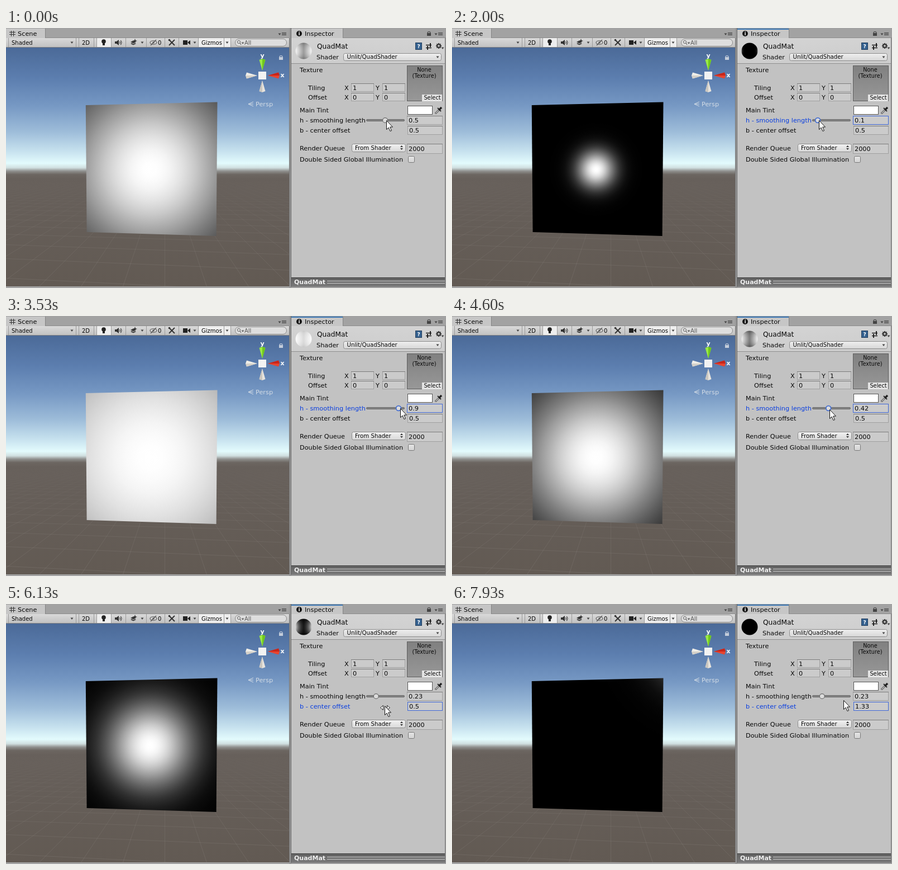
Write an HTML page with a canvas that moves like this. It is 788 by 465 pixels and loops after 8000 ms.

```html
<!DOCTYPE html>
<html lang="en">
<head>
<meta charset="utf-8">
<title>Shader inspector</title>
<style>
html, body { margin: 0; width: 788px; height: 465px; overflow: hidden; background: #a2a2a2; }
canvas { display: block; }
</style>
</head>
<body>
<canvas id="stage" width="788" height="465"></canvas>
<script>
const W = 788, H = 465, LOOP = 8000, FPS = 15;
const screen2d = document.getElementById('stage').getContext('2d');
const backdrop = document.createElement('canvas');
backdrop.width = W;
backdrop.height = H;
let g = backdrop.getContext('2d');

const BLUE = '#0a3fe0';
const QUAD = [[142.8, 138], [378.5, 132.6], [376.6, 372], [144.6, 365]];

// ---- drawing helpers
function rect(x, y, w, h, fill, stroke) {
  if (fill) { g.fillStyle = fill; g.fillRect(x, y, w, h); }
  if (stroke) { g.strokeStyle = stroke; g.lineWidth = 1; g.strokeRect(x + .5, y + .5, w - 1, h - 1); }
}
function rounded(x, y, w, h, r, fill, stroke) {
  g.beginPath();
  g.roundRect(x + .5, y + .5, w - 1, h - 1, r);
  if (fill) { g.fillStyle = fill; g.fill(); }
  if (stroke) { g.strokeStyle = stroke; g.lineWidth = 1; g.stroke(); }
}
function poly(points, fill, stroke, width = 1) {
  g.beginPath();
  points.forEach(([x, y]) => g.lineTo(x, y));
  g.closePath();
  if (fill) { g.fillStyle = fill; g.fill(); }
  if (stroke) { g.strokeStyle = stroke; g.lineWidth = width; g.stroke(); }
}
function line(x1, y1, x2, y2, color, width = 1) {
  g.beginPath();
  g.moveTo(x1, y1);
  g.lineTo(x2, y2);
  g.strokeStyle = color;
  g.lineWidth = width;
  g.stroke();
}
function disc(x, y, r, fill, stroke, width = 1) {
  g.beginPath();
  g.arc(x, y, r, 0, 7);
  if (fill) { g.fillStyle = fill; g.fill(); }
  if (stroke) { g.strokeStyle = stroke; g.lineWidth = width; g.stroke(); }
}
function text(s, x, y, size = 11.3, color = '#080808', weight = '', align = 'left') {
  g.font = `${weight} ${size}px "DejaVu Sans", sans-serif`;
  g.fillStyle = color;
  g.textAlign = align;
  g.fillText(s, x, y);
}
function vertical(y1, y2, ...stops) {
  const fill = g.createLinearGradient(0, y1, 0, y2);
  stops.forEach((c, i) => fill.addColorStop(i / (stops.length - 1), c));
  return fill;
}
const arrowDown = (x, y, c = '#444') => poly([[x - 2.5, y - 1.5], [x + 2.5, y - 1.5], [x, y + 2]], c);

function field(x, y, w, h, value, focused) {
  rect(x, y, w, h, '#cbcbcb', focused ? '#4169d8' : '#a0a0a0');
  if (!focused) rect(x, y, w, 1, '#7c7c7c');
  text(value, x + 3, y + h / 2 + 4);
}
function padlock(x, y, color) {
  rect(x - 3, y, 7, 5, color);
  g.beginPath();
  g.arc(x + .5, y, 2.5, Math.PI, 0);
  g.strokeStyle = color;
  g.lineWidth = 1.2;
  g.stroke();
}
function paneMenu(x) {
  arrowDown(x, 11);
  for (const y of [8, 10, 12]) rect(x + 4, y, 8, 1, '#444');
}

// ---- scene pane
function drawGround() {
  const horizon = 238, focal = 371, height = 3, yaw = 0.082;
  const cos = Math.cos(yaw), sin = Math.sin(yaw);
  const project = (a, b) => {
    const z = b * cos - a * sin, x = a * cos + b * sin;
    return [254 + focal * x / z, horizon + focal * height / z];
  };
  const fade = vertical(268, 462, 'rgba(165,160,155,0)', 'rgba(165,160,155,.12)', 'rgba(165,160,155,.18)');
  for (let n = -30; n <= 30; n++) line(...project(n, 3.8 + Math.max(0, n * .1)), ...project(n, 38), fade);
  for (let n = 4; n < 34; n++) line(...project(-n * .9, n), ...project(n * .9, n), fade);
}
function drawSky() {
  const stops = [[35, '#4b6a98'], [90, '#5c7eaf'], [140, '#7799c4'], [185, '#9dbcd9'], [220, '#c6e1ee'],
    [242, '#e3fbfd'], [250, '#d0dfe0'], [256, '#8f8f8d'], [262, '#6c6661'], [270, '#67605b'], [462, '#625a53']];
  const sky = g.createLinearGradient(0, 35, 0, 462);
  stops.forEach(([y, c]) => sky.addColorStop((y - 35) / 427, c));
  rect(0, 35, 508, 427, sky);
}
function drawGizmo() {
  const cone = (x, y, dx, dy, base, tone) => {
    const px = dy * 5.5, py = dx * 5.5;
    const bx = x + dx * 19, by = y + dy * 19;
    poly([[x, y], [bx + px, by + py], [bx + dx * 2, by + dy * 2], [bx - px, by - py]], base);
    poly([[x, y], [bx - px, by - py], [bx + dx * 2, by + dy * 2]], tone);
  };
  cone(459, 76, 0, -1, '#9bea45', '#6fc81c');
  cone(469, 85, 1, 0, '#e8442f', '#c8251a');
  cone(450, 85, -1, 0, '#f0eee8', '#d4d0c8');
  cone(459, 94, 0, 1, '#e8e4dd', '#cbc7c0');
  rect(452, 78, 14, 14, '#f2f2f2');
  text('y', 459, 53, 11, '#fff', 'bold', 'center');
  text('x', 495, 88, 11, '#fff', 'bold', 'center');
  padlock(492, 52, '#c3ccda');
  for (const y of [132, 136, 140]) line(434, 136, 443, y, '#d4dde6');
  text('Persp', 447, 140, 11.3, '#d4dde6');
}
function drawToolbar() {
  rect(0, 18, 508, 17, vertical(18, 34, '#d9d9d9', '#c2c2c2'));
  rect(0, 34, 508, 1, '#828282');
  rect(162, 18, 26, 16, '#eeeeee');
  rect(344, 18, 58, 16, '#eeeeee');
  for (const x of [4, 125, 130, 157, 162, 188, 214, 251, 284, 309, 344, 390, 402]) rect(x, 18, 1, 16, '#9b9b9b');
  text('Shaded', 10, 30, 10);
  text('2D', 136, 30, 10);
  text('Gizmos', 350, 30, 10);
  for (const x of [118, 244, 338, 396]) arrowDown(x, 26);
  disc(175, 24, 3.8, '#222');
  rect(173, 27, 4, 4, '#222');
  poly([[195, 24], [198, 24], [202, 21], [202, 31], [198, 28], [195, 28]], '#333');
  for (const r of [2.5, 5]) {
    g.beginPath();
    g.arc(202, 26, r, -.9, .9);
    g.strokeStyle = '#333';
    g.lineWidth = 1.1;
    g.stroke();
  }
  for (const y of [29, 26]) poly([[222, y - 1], [228, y - 4], [234, y - 1], [228, y + 2]], '#333', '#d0d0d0');
  poly([[231, 19], [232, 22], [235, 23], [232, 24], [231, 27], [230, 24], [227, 23], [230, 22]], '#333');
  g.beginPath();
  g.ellipse(264, 26, 6, 3.3, 0, 0, 7);
  g.strokeStyle = '#555';
  g.lineWidth = 1.1;
  g.stroke();
  disc(264, 26, 1.6, '#555');
  line(259, 31, 269, 21, '#555', 1.3);
  text('0', 272, 30, 10);
  line(292, 21, 302, 31, '#333', 2);
  line(302, 21, 292, 31, '#333', 2);
  disc(292.5, 21.5, 1.8, '#333');
  rect(317, 22, 8, 8, '#222');
  poly([[325, 26], [330, 22], [330, 30]], '#222');
  rounded(410, 19, 93, 14, 7, '#dedede', '#8a8a8a');
  disc(417, 25, 2.6, null, '#666');
  line(419, 27, 421, 30, '#666', 1.3);
  arrowDown(424, 27, '#666');
  text('All', 427, 30, 10, '#555');
}
function drawScene() {
  rect(0, 0, W, H, '#a2a2a2');
  rect(0, 1, 70, 17, '#c6c6c6');
  rect(70, 1, 1, 17, '#858585');
  rect(71, 17, 437, 1, '#8b8b8b');
  for (const d of [9, 13]) {
    line(d + .5, 5, d + .5, 15, '#333');
    line(6, d - 1.5, 17, d - 1.5, '#333');
  }
  text('Scene', 21, 14);
  paneMenu(490);
  drawSky();
  drawGround();
  drawToolbar();
  drawGizmo();
  rect(0, 462, 508, 3, '#a2a2a2');
  rect(507, 0, 4, H, '#989898');
  rect(507, 18, 1, 444, '#707070');
  rect(510, 0, 1, 463, '#666');
}

// ---- inspector pane
function drawInspector() {
  rect(511, 0, 277, 18, '#a2a2a2');
  rect(511, 1, 92, 17, '#c6c6c6');
  rect(603, 1, 1, 17, '#858585');
  rect(604, 17, 184, 1, '#8b8b8b');
  rect(511, 18, 275, 428, '#c2c2c2');
  rect(511, 18, 275, 45, vertical(18, 62, '#d3d3d3', '#cdcdcd'));
  rect(511, 63, 275, 1, '#8f8f8f');
  rect(786, 18, 1, 445, '#777');
  disc(525, 10, 5, '#161616');
  text('i', 525, 13, 8, '#fff', 'bold', 'center');
  text('Inspector', 535, 14);
  padlock(757, 9, '#444');
  paneMenu(770);

  text('QuadMat', 557, 37, 12.2);
  text('Shader', 556, 56);
  rounded(604, 45, 176, 14, 3, vertical(45, 59, '#f0f0f0', '#d6d6d6'), '#8c8c8c');
  text('Unlit/QuadShader', 610.5, 55, 10.2);
  arrowDown(773, 52);
  rect(733, 26, 12, 13, '#35618f', '#233f5f');
  text('?', 739, 36, 9, '#fff', 'bold', 'center');
  line(752, 30.5, 762, 30.5, '#222', 1.5);
  line(752, 35.5, 762, 35.5, '#222', 1.5);
  rect(759, 27, 2, 7, '#222');
  rect(754, 32, 2, 7, '#222');
  for (let i = 0; i < 4; i++) {
    const a = i * Math.PI / 4, x = 5 * Math.cos(a), y = 5 * Math.sin(a);
    line(775 - x, 32 - y, 775 + x, 32 + y, '#333', 2);
  }
  disc(775, 32, 2.7, '#d0d0d0', '#333', 1.8);
  arrowDown(782, 36);

  text('Texture', 526, 79);
  [['Tiling', 99, '1'], ['Offset', 116, '0']].forEach(([label, y, value]) => {
    text(label, 541, y + 12);
    text('X', 606, y + 12);
    text('Y', 662, y + 12);
    field(618, y, 41, 15, value);
    field(674, y, 41, 15, value);
  });
  rect(718, 67, 64, 64, vertical(67, 131, '#808080', '#989898'), '#5e5e5e');
  text('None', 749, 78, 9.7, '#080808', '', 'center');
  text('(Texture)', 749, 89, 9.7, '#080808', '', 'center');
  rect(745, 119, 36, 12, '#e4e4e4');
  text('Select', 763.5, 128, 9.8, '#080808', '', 'center');

  text('Main Tint', 526, 151);
  rect(719, 139, 45, 16, '#fff', '#555');
  line(769, 153, 776, 146, '#333', 3);
  line(769.5, 152.5, 775, 147, '#ddd', 1.2);
  line(773, 143, 779, 149, '#222', 1.8);
  line(776, 146, 780, 142, '#222', 3.4);

  text('Render Queue', 526, 219);
  rounded(619, 207, 97, 15, 3, vertical(207, 222, '#f2f2f2', '#d8d8d8'), '#8c8c8c');
  text('From Shader', 625, 218, 10.2);
  poly([[706, 213], [711, 213], [708.5, 210]], '#333');
  poly([[706, 215], [711, 215], [708.5, 218]], '#333');
  field(718, 207, 64, 18, '2000');
  text('Double Sided Global Illumination', 526, 239);
  rounded(720, 229, 12, 12, 2, vertical(229, 241, '#e6e6e6', '#d2d2d2'), '#777');

  rect(511, 446, 275, 17, vertical(446, 463, '#606060', '#7b7b7b'));
  rect(511, 446, 275, 1, '#3f3f3f');
  text('QuadMat', 516, 458, 11, '#f0f0f0', 'bold');
  for (const y of [452, 456]) rect(575, y, 211, 1, '#cfcfcf');
}

// ---- motion, in seconds
function track(keys, t) {
  if (t <= keys[0][0]) return keys[0][1];
  for (let i = 1; i < keys.length; i++) {
    const [t0, v0] = keys[i - 1], [t1, v1] = keys[i];
    if (t <= t1) return v0 + (v1 - v0) * (t - t0) / (t1 - t0);
  }
  return keys[keys.length - 1][1];
}
const smoothing = [[.03, .5], [.87, .95], [1.2, .95], [1.6, .52], [2, .1], [2.4, .06], [2.6, .06], [2.8, .2],
  [3.4, .88], [3.53, .9], [4.2, .92], [4.6, .42], [5.07, .23]];
const center = [[6.135, .5], [6.73, 0], [6.87, 0], [7.6, 1.26], [7.7, 1.26], [7.93, 1.33]];
// how far the pointer runs ahead of the slider, in pixels
const lead = [[2.6, 0], [2.8, 2.4], [3.4, .6], [4.2, .6], [4.6, 0]];
const pointerX = [[5.1, 665], [5.53, 683], [5.7, 683], [5.87, 678]];
const pointerY = [[0, 166], [3.5, 166], [4.6, 168], [5.1, 168], [5.53, 188], [5.7, 188], [5.87, 183],
  [6.3, 183], [7.6, 175], [7.93, 173]];

// ---- moving parts
const gauss = d2 => Math.exp(-d2 / 2);
const grey = v => { const n = Math.round(255 * v); return `rgb(${n},${n},${n})`; };

function drawQuad(h, b) {
  const cx = 258 + 233 * (b - .5), cy = 253 - 233 * (b - .5);
  const glow = g.createRadialGradient(cx, cy, 0, cx, cy, 4 * h * 233);
  for (let i = 0; i <= 40; i++) glow.addColorStop(i / 40, i < 40 ? grey(gauss(i * i / 100)) : '#000');
  poly(QUAD, glow);
}
function drawThumbnail(h, b) {
  g.save();
  g.beginPath();
  g.arc(533, 41, 14.5, 0, 7);
  g.clip();
  for (let j = -15; j < 15; j++) {
    const v = .5 - Math.asin((j + .5) / 15) / Math.PI;
    for (let i = -15; i < 15; i++) {
      const u = (1 + Math.asin((i + .5) / 16) / Math.PI) % 1;
      rect(533 + i, 41 + j, 1, 1, grey(gauss(((u - b) ** 2 + (v - b) ** 2) / (h * h))));
    }
  }
  g.restore();
}
function drawPointer(x, y, sliding) {
  if (sliding) {
    poly([[x - 8, y + 3], [x - 3, y - 1], [x - 3, y + 7]], '#fff', '#222');
    poly([[x + 9, y + 3], [x + 4, y - 1], [x + 4, y + 7]], '#fff', '#222');
  }
  const shape = [[0, 0], [0, 16], [3.6, 12.6], [6.5, 19], [9, 18], [6.2, 11.6], [11, 11.6]];
  poly(shape.map(([dx, dy]) => [x + dx, y + dy]), '#fff', '#111');
}

function draw(ms) {
  const t = Math.floor(ms * FPS / 1000 + .06) / FPS;
  const h = track(smoothing, t), b = track(center, t), ahead = track(lead, t);
  const focus = t < .06 ? '' : t < 6.06 ? 'h' : 'b';
  const ink = name => focus === name ? BLUE : '#080808';
  const show = v => String(+v.toFixed(2));

  g.drawImage(backdrop, 0, 0);
  if (focus) rect(511, 1, 92, 2, '#3c78b4');
  drawQuad(h + ahead / 60, b);
  drawThumbnail(h, b);

  const knob = 649 + 60 * h;
  text('h - smoothing length', 526, 169, 11.3, ink('h'));
  rounded(645, 163, 69, 4, 2, '#858585', '#696969');
  disc(knob, 165, 4.4, '#dcdcdc', focus === 'h' ? '#466fd0' : '#6b6b6b', focus === 'h' ? 1.8 : 1.1);
  field(718, 157, 64, 16, show(h), focus === 'h');
  text('b - center offset', 526, 187, 11.3, ink('b'));
  field(719, 175, 63, 16, show(b), focus === 'b');

  const x = t < 5.1 ? knob + 2 + ahead : track(pointerX, t) + (b - .5) * 27.7;
  const y = track(pointerY, t);
  drawPointer(Math.round(x) + .5, Math.round(y) - .5, t > 5.5 && y > 176);
}

drawScene();
drawInspector();
g = screen2d;
function tick() {
  draw(performance.now() % LOOP);
  requestAnimationFrame(tick);
}
tick();
</script>
</body>
</html>
```
